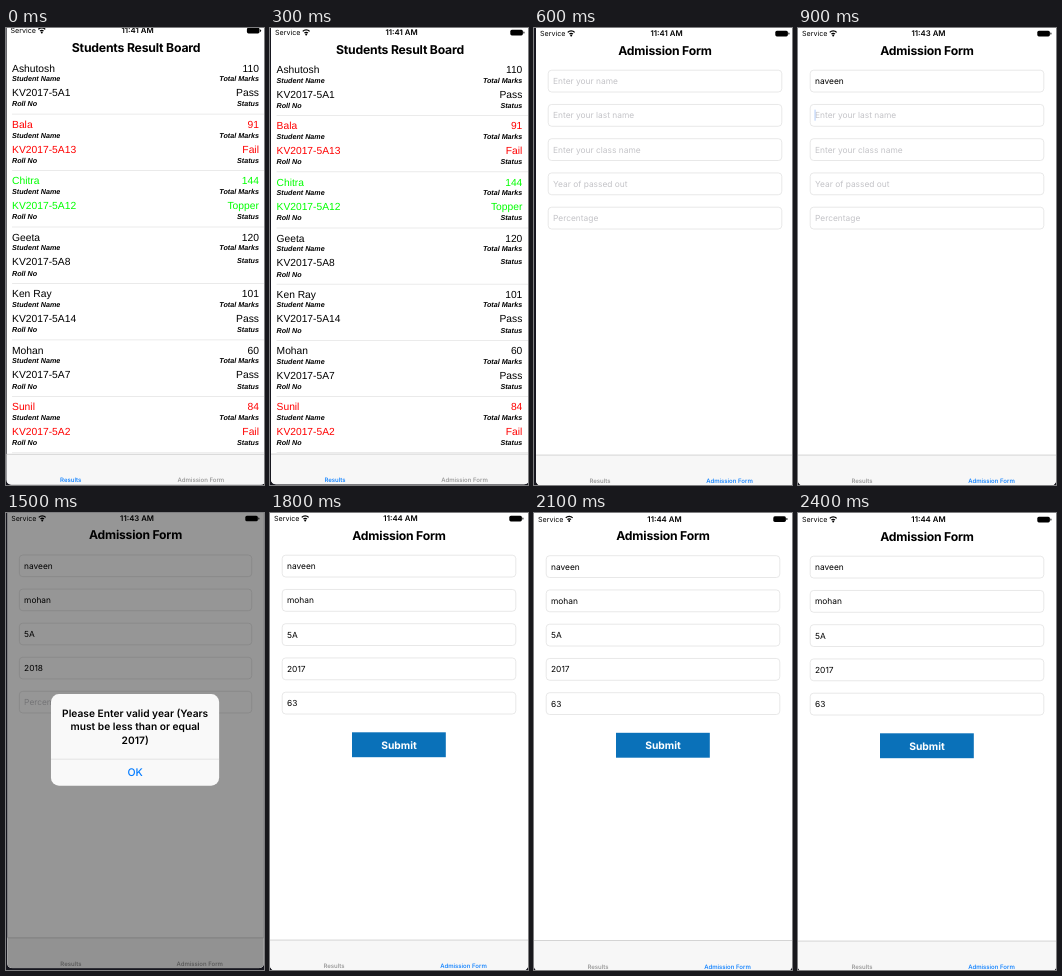
These frames come from a looping animation (258 px wide and 457 px high, 2.7 s). An HTML page:

```html
<!DOCTYPE html>
<html lang="en">
<head>
<meta charset="utf-8">
<title>Results and admission</title>
<style>
  html, body { margin: 0; width: 100%; height: 100%; overflow: hidden; background: #17171f; }
  svg { display: block; width: 100vw; height: 100vh; }
  text { font-family: Inter, "Open Sans", sans-serif; text-rendering: geometricPrecision; }
  .title { font-size: 12.2px; font-weight: 700; letter-spacing: -.2px; }
  .signal { font-size: 7.1px; }
  .clock { font-size: 7.8px; font-weight: 600; }
  .value, .label { font-family: "Liberation Sans", Arial, sans-serif; }
  .value { font-size: 10.25px; }
  .label { font-size: 7.15px; font-weight: 700; font-style: italic; }
  .field { font-size: 8.4px; }
  .button { font-size: 10.3px; font-weight: 700; }
  .alert { font-size: 10.25px; font-weight: 600; }
  .ok { font-size: 10.6px; font-weight: 500; }
  .tab { font-size: 6.05px; font-weight: 500; }
</style>
</head>
<body>
<svg viewBox="0 0 258 457" preserveAspectRatio="none"><g id="screen"></g></svg>
<script>
const STEP = 300;
const BLUE = '#007aff', GRAY = '#929292';
const screen = document.getElementById('screen');

const students = [
  ['Ashutosh', 110, 1, 'Pass', '#000'],
  ['Bala', 91, 13, 'Fail', '#f00'],
  ['Chitra', 144, 12, 'Topper', '#0f0'],
  ['Geeta', 120, 8, '', '#000'],
  ['Ken Ray', 101, 14, 'Pass', '#000'],
  ['Mohan', 60, 7, 'Pass', '#000'],
  ['Sunil', 84, 2, 'Fail', '#f00']
];

const hints = ['Enter your name', 'Enter your last name', 'Enter your class name',
  'Year of passed out', 'Percentage'];
const filled = ['naveen', 'mohan', '5A', '2017', '63'];

// pose: x shift, y shift, scale
const scenes = [
  { pose: [.4, -3, 1.005], time: '11:41', board: true },
  { pose: [1, -1, 1], time: '11:41', board: true },
  { pose: [2, 0, 1], time: '11:41', values: [] },
  { pose: [0, 0, 1], time: '11:43', values: filled.slice(0, 1), caret: 1 },
  { pose: [-1, 0, 1.005], time: '11:43', values: filled.slice(0, 2), caret: 2 },
  { pose: [1.2, 0, .995], time: '11:43', values: ['naveen', 'mohan', '5A', '2018'], alert: true },
  { pose: [0, 0, 1], time: '11:44', values: filled },
  { pose: [0, .5, 1], time: '11:44', values: filled },
  { pose: [0, 1, 1], time: '11:44', values: filled }
];

const text = (cls, x, y, s, fill = '#000', anchor = 'start') =>
  `<text class="${cls}" x="${x}" y="${y}" fill="${fill}" text-anchor="${anchor}">${s}</text>`;
const mid = (cls, x, y, s, fill) => text(cls, x, y, s, fill, 'middle');
const rect = (x, y, w, h, fill, extra = '') =>
  `<rect x="${x}" y="${y}" width="${w}" height="${h}" fill="${fill}" ${extra}/>`;
const hline = (x1, x2, y, color) => rect(x1, y, x2 - x1, .7, color);

function statusBar(time) {
  const arcs = [2.3, 4.6].map(r => {
    const d = r * .75;
    return `<path d="M${35.2 - d} ${7.8 - d}A${r} ${r} 0 0 1 ${35.2 + d} ${7.8 - d}"
      fill="none" stroke="#000" stroke-width="1.3"/>`;
  }).join('');
  return text('signal', 4, 8.1, 'Service') + arcs +
    '<circle cx="35.2" cy="7.5" r="1"/>' +
    mid('clock', 130.5, 8.3, time + ' AM') +
    rect(239.3, 2.8, 12.6, 5.6, '#000', 'rx="1.6"') +
    rect(252.4, 4.6, 1, 2, '#000', 'rx=".5"');
}

function boardRow([name, marks, roll, status, color], i) {
  const y = 46.3 + i * 56.17, left = 5.6, right = 251.3;
  const end = (cls, dy, s, c) => text(cls, right, y + dy, s, c, 'end');
  return text('value', left, y, name, color) +
    text('label', left, y + 9.5, 'Student Name') +
    text('value', left, y + 24.5, 'KV2017-5A' + roll, color) +
    text('label', left, y + 34.8, 'Roll No') +
    end('value', 0, marks, color) +
    end('label', 9.5, 'Total Marks') +
    end('value', 24.5, status, color) +
    end('label', status ? 34.8 : 22.3, 'Status') +
    hline(left, 258, y + 42, '#e2e2e2');
}

function formField(hint, i, values, caret) {
  const y = 42.2 + i * 34.25, value = values[i];
  return rect(12.2, y, 233.6, 21.8, '#fff', 'rx="3.5" stroke="#e2e2e2" stroke-width=".8"') +
    text('field', 17, y + 13.9, value || hint, value ? '#000' : '#c4c4c8') +
    (caret === i ? rect(16.6, y + 5.2, .9, 11, '#a9c6f7') : '');
}

function form({ values, caret }) {
  const submit = values.length === hints.length
    ? rect(82, 219.3, 93.8, 24.9, '#0a71b9') + mid('button', 129, 235.5, 'Submit', '#fff')
    : '';
  return hints.map((h, i) => formField(h, i, values, caret)).join('') + submit;
}

function tabBar(board, dimmed) {
  const tint = on => on && !dimmed ? BLUE : GRAY;
  return rect(0, 427, 258, 30.5, '#f7f7f7') +
    hline(0, 258, 426.7, '#c4c4c4') +
    mid('tab', 64, 455.2, 'Results', tint(board)) +
    mid('tab', 193.5, 455.2, 'Admission Form', tint(!board));
}

function alertBox() {
  const lines = ['Please Enter valid year (Years', 'must be less than or equal', '2017)'];
  return rect(0, -10, 258, 467.5, '#000', 'opacity=".41"') +
    rect(44, 182, 169, 92, '#f9f9f9', 'rx="8"') +
    lines.map((s, i) => mid('alert', 128.6, 204.6 + i * 13.6, s)).join('') +
    hline(44, 213, 247, '#d9d9d9') +
    mid('ok', 128.6, 264.5, 'OK', BLUE);
}

function draw(scene) {
  const [x, y, k] = scene.pose;
  screen.setAttribute('transform', `translate(${x} ${y}) scale(${k})`);
  screen.innerHTML =
    '<clipPath id="window"><rect y="-10" width="258" height="467.5" rx="5"/></clipPath>' +
    '<g clip-path="url(#window)">' +
    rect(0, -10, 258, 467.5, '#fff') +
    statusBar(scene.time) +
    mid('title', 129, 26.5, scene.board ? 'Students Result Board' : 'Admission Form') +
    (scene.board ? students.map(boardRow).join('') : form(scene)) +
    tabBar(scene.board, scene.alert) +
    (scene.alert ? alertBox() : '') +
    '</g>';
}

let start, shown = -1;
function tick(now) {
  start ??= now;
  const i = Math.floor((now - start) / STEP) % scenes.length;
  if (i !== shown) draw(scenes[shown = i]);
  requestAnimationFrame(tick);
}
draw(scenes[shown = 0]);
requestAnimationFrame(tick);
</script>
</body>
</html>
```
